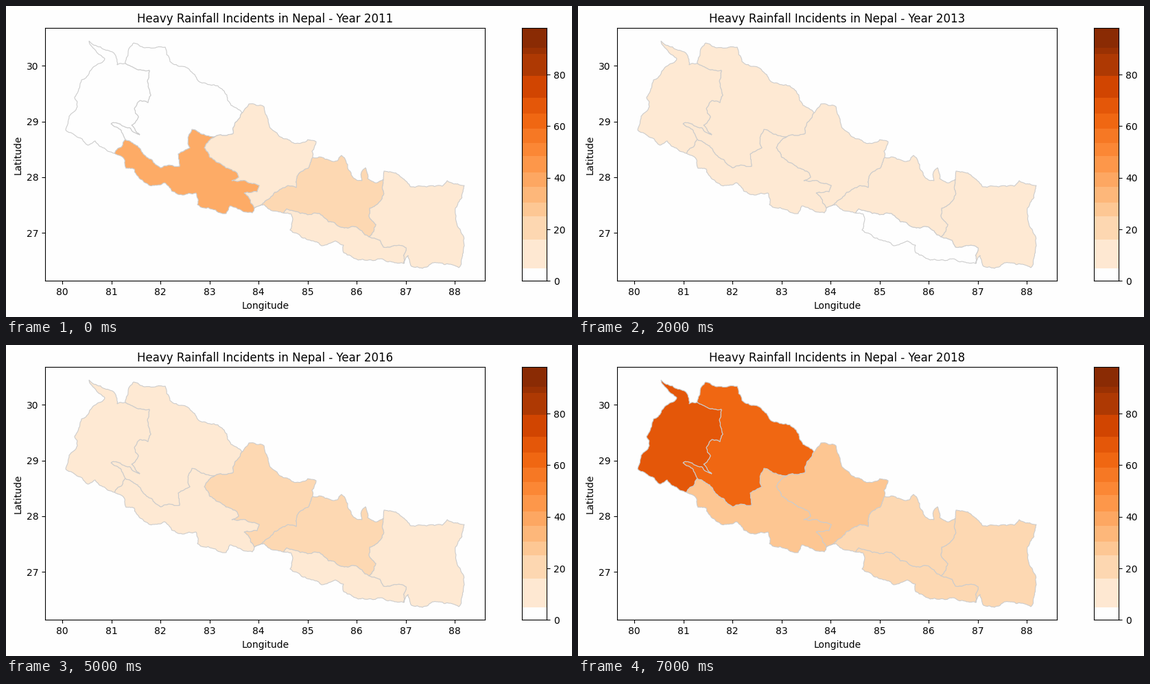
These frames come from a looping animation (825x454 px, 8000 ms). A matplotlib script:

```python
import random

import matplotlib.pyplot as plt
from matplotlib.animation import FuncAnimation
from matplotlib.patches import Polygon

W, H, DPI = 825, 454, 100
LEFT, RIGHT, TOP, BOTTOM = 57.4, 698.4, 32.35, 401.35
PAPER = "#fefefe"
MAX_INCIDENTS = 98
oranges = plt.get_cmap("Oranges")
rng = random.Random(7)


def lon(x):
    return 80 + (x - 82.2) / 71.5


def lat(y):
    return 30 - (y - 87.25) / 81.35


def rough_line(a, b):
    """Split a to b by random midpoints; the end b is left out."""
    if abs(b - a) < 3:
        return [a]
    mid = (a + b) / 2 + (b - a) * 1j * rng.uniform(-0.13, 0.13)
    return rough_line(a, mid) + rough_line(mid, b)


def border(start, end, *via):
    """Ragged line between two junctions through a few key points."""
    keys = [complex(*p) for p in (start, *via, end)]
    line = [z for a, b in zip(keys, keys[1:]) for z in rough_line(a, b)]
    return [(lon(z.real), lat(z.imag)) for z in line + keys[-1:]]


def back(line):
    return line[::-1]


# Junctions where borders meet, in pixels
SW, NW, N, NC, NE = (158, 215), (174, 84), (344, 156), (447, 221), (550, 253)
SE, SC, S = (580, 376), (404, 302), (362, 295)
IN_W, IN_MID, IN_E = (174, 195), (307, 189), (529, 337)

# Outer borders, clockwise from the south-west
far_west_rim = border(
    SW, NW, (130, 197), (119, 203), (101, 189), (87, 181), (92, 161),
    (104, 147), (100, 133), (110, 108), (131, 87), (144, 77), (121, 51),
    (155, 67), (162, 86))
karnali_rim = border(
    NW, N, (186, 54), (220, 60), (232, 60), (239, 81), (275, 100),
    (280, 109), (322, 130), (328, 145))
gandaki_rim = border(
    N, NC, (354, 143), (376, 147), (385, 178), (430, 200), (440, 195),
    (452, 198), (446, 212))
bagmati_rim = border(
    NC, NE, (483, 226), (489, 218), (511, 254), (519, 255), (519, 241),
    (524, 236), (527, 252), (541, 258))
east_rim = border(
    NE, SE, (551, 241), (564, 243), (590, 264), (636, 263), (643, 255),
    (668, 262), (655, 295), (663, 330), (668, 350), (660, 382), (648, 377),
    (632, 375), (607, 383), (591, 380), (586, 364))
madhesh_rim = border(
    SE, SC, (550, 370), (503, 365), (492, 360), (492, 349), (480, 343),
    (460, 350), (450, 344), (414, 327), (416, 304))
bagmati_foot = border(SC, S, (388, 299), (376, 290))
lumbini_rim = border(
    S, SW, (359, 302), (326, 292), (321, 303), (279, 290), (277, 273),
    (257, 276), (231, 258), (216, 262), (190, 246), (187, 238), (175, 237),
    (172, 223))

# Borders between provinces
west_lumbini = border(SW, IN_W)
west_karnali = border(
    NW, IN_W, (188, 91), (209, 94), (206, 110), (211, 130), (207, 141),
    (195, 138), (187, 150), (193, 162), (183, 174), (195, 188), (181, 178),
    (157, 170), (153, 172), (168, 182))
karnali_lumbini = border(
    IN_W, IN_MID, (199, 214), (225, 236), (253, 234), (251, 216), (268, 207),
    (266, 190), (271, 180))
karnali_gandaki = border(N, IN_MID, (331, 186))
lumbini_gandaki = border(
    IN_MID, S, (289, 207), (297, 221), (336, 243), (339, 250), (329, 255),
    (369, 262), (366, 271), (347, 273), (354, 280))
gandaki_bagmati = border(
    NC, S, (440, 237), (424, 249), (423, 265), (411, 262), (376, 287))
bagmati_madhesh = border(
    SC, IN_E, (409, 296), (450, 302), (470, 315), (508, 322))
bagmati_east = border(
    NE, IN_E, (550, 276), (530, 295), (529, 307), (539, 319))
madhesh_east = border(IN_E, SE, (545, 342), (550, 352), (583, 353))

# East to west, the order in which they are painted
provinces = [
    east_rim + back(madhesh_east) + back(bagmati_east),
    bagmati_madhesh + madhesh_east + madhesh_rim,
    (bagmati_rim + bagmati_east + back(bagmati_madhesh) + bagmati_foot
     + back(gandaki_bagmati)),
    (gandaki_rim + gandaki_bagmati + back(lumbini_gandaki)
     + back(karnali_gandaki)),
    karnali_lumbini + lumbini_gandaki + lumbini_rim + west_lumbini,
    karnali_rim + karnali_gandaki + back(karnali_lumbini) + back(west_karnali),
    far_west_rim + west_karnali + back(west_lumbini),
]

# Incidents per year, in the same order
incidents = {
    2011: (10, 10, 20, 10, 38, 0, 0),
    2012: (10, 0, 34, 0, 0, 45, 45),
    2013: (10, 0, 10, 10, 10, 10, 10),
    2014: (20, 10, 10, 10, 20, 20, 20),
    2015: (0, 0, 0, 0, 0, 0, 10),
    2016: (10, 10, 20, 20, 10, 10, 10),
    2017: (10, 20, 10, 10, 20, 10, 20),
    2018: (20, 20, 20, 28, 28, 62, 68),
}
years = list(incidents)


def shade(value):
    return oranges(value / MAX_INCIDENTS) if value else PAPER


def add_axes(x0, x1):
    return fig.add_axes([x0 / W, 1 - BOTTOM / H, (x1 - x0) / W,
                         (BOTTOM - TOP) / H], facecolor=PAPER)


fig = plt.figure(figsize=(W / DPI, H / DPI), dpi=DPI, facecolor=PAPER)
ax = add_axes(LEFT, RIGHT)
ax.set(xlim=(lon(LEFT), lon(RIGHT)), ylim=(lat(BOTTOM), lat(TOP)),
       xticks=range(80, 89), yticks=range(27, 31),
       xlabel="Longitude", ylabel="Latitude")
title = ax.set_title("")
shapes = [ax.add_patch(Polygon(p, closed=True, edgecolor="0.8", linewidth=0.8))
          for p in provinces]

# Colour scale in uneven steps above a blank lowest band
bar = add_axes(752.4, 788.4)
steps = [5, 16, 25, 30.5, 36.5, 42, 48.5, 53.5, 59, 65, 71, 79.5, 88, 90.5,
         MAX_INCIDENTS]
for low, high in zip(steps, steps[1:]):
    bar.axhspan(low, high, facecolor=shade((low + high) / 2), linewidth=0)
bar.yaxis.tick_right()
bar.set(ylim=(0, MAX_INCIDENTS), xticks=[], yticks=range(0, 81, 20))


def draw(i):
    year = years[i]
    title.set_text(f"Heavy Rainfall Incidents in Nepal - Year {year}")
    for shape, value in zip(shapes, incidents[year]):
        shape.set_facecolor(shade(value))
    return [title, *shapes]


anim = FuncAnimation(fig, draw, frames=len(years), interval=1000, repeat=True,
                     repeat_delay=0)
plt.show()
```
